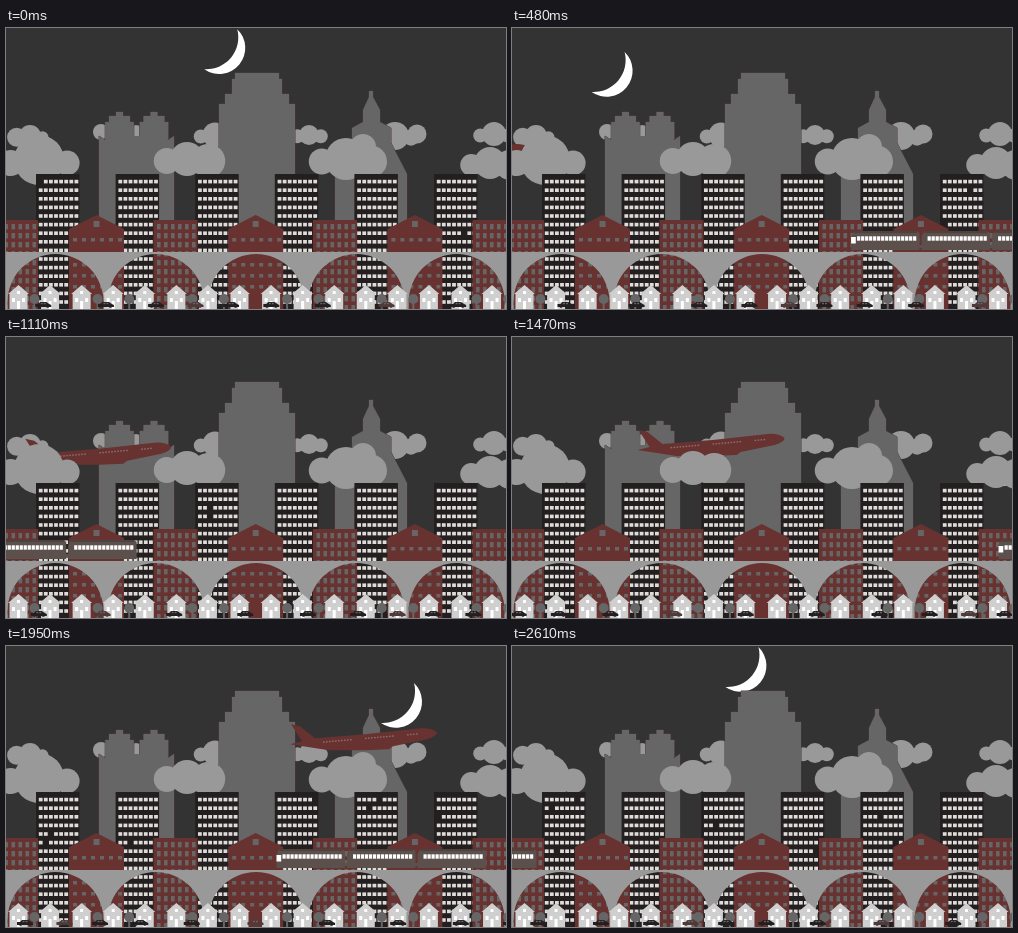
Animation of 500 by 281 pixels, one loop 2.67 s. Source, as an HTML page with a canvas:

```html
<!DOCTYPE html>
<html>
<head>
<meta charset="utf-8">
<style>
html, body { margin: 0; width: 100%; height: 100%; overflow: hidden; background: #333; }
canvas { display: block; }
</style>
</head>
<body>
<canvas id="stage" width="500" height="281"></canvas>
<script>
const ctx = document.getElementById('stage').getContext('2d');
const LOOP = 2670;
const SKY = '#333333', GRAY = '#666666', CLOUD = '#999999', BLACK = '#231f20',
      RED = '#673230', EDGE = '#4f3a39', LIT = '#dedbd8', STEEL = '#5c504c', WHITE = '#ffffff';

function rect(color, x, y, w, h) {
  ctx.fillStyle = color;
  ctx.fillRect(x, y, w, h);
}

function circle(color, x, y, r) {
  ctx.fillStyle = color;
  ctx.beginPath();
  ctx.arc(x, y, r, 0, 7);
  ctx.fill();
}

function shape(color, path, edge) {
  const outline = new Path2D(path);
  if (edge) {
    ctx.strokeStyle = edge;
    ctx.stroke(outline);
  }
  ctx.fillStyle = color;
  ctx.fill(outline, 'evenodd');
}

function at(x, y, draw) {
  ctx.save();
  ctx.translate(x, y);
  draw();
  ctx.restore();
}

function grid(color, x, y, cols, rows, dx, dy, w, h, visible = () => true) {
  for (let row = 0; row < rows; row++)
    for (let col = 0; col < cols; col++)
      if (visible(row, col)) rect(color, x + col * dx, y + row * dy, w, h);
}

function noise(a, b, c, d) {
  const n = Math.sin(a * 12.99 + b * 78.23 + c * 37.72 + d * 53.17) * 43758.5453;
  return n - Math.floor(n);
}

// A main puff with a smaller one leaning out on either side.
function cloud(x, y, r, left = 0, right = 0) {
  circle(CLOUD, x, y, r);
  circle(CLOUD, x - r - left / 4, y + r * 0.12, left);
  circle(CLOUD, x + r + right / 4, y + r * 0.12, right);
}

function backClouds() {
  cloud(24, 108, 11, 9.5, 6);
  cloud(95, 104, 8);
  cloud(130, 106, 9);
  cloud(209, 107, 12.5, 7);
  cloud(303, 107, 10, 7, 7);
  cloud(389, 108, 14, 0, 8);
  cloud(411, 106, 9.5);
  cloud(488, 106, 12, 7, 7);
}

function frontClouds() {
  cloud(33, 132, 25, 13, 12.5);
  cloud(181, 131, 17, 13, 17);
  cloud(340, 131, 21, 13, 16);
  cloud(357, 119, 13);
  cloud(484, 135, 16, 11, 15);
}

function moon(t) {
  const ahead = t < 1200 ? 0 : LOOP;
  const angle = -0.0333 - 0.000648 * (t - ahead);
  at(228 + 390 * Math.sin(angle), 411 - 390 * Math.cos(angle), () =>
    shape(WHITE, 'M16.5-20A26 26 0 0 1-16.5 20A32 32 0 0 0 16.5-20Z'));
}

// Symmetric stepped tower: alternating half widths and tops, from the base up.
function stepped(x, bottom, ...steps) {
  let left = '', right = '';
  for (let i = 0; i < steps.length; i += 2) {
    const half = steps[i], top = steps[i + 1];
    left += `H${x - half}V${top}`;
    right = `H${x + half}V${steps[i - 1] ?? bottom}` + right;
  }
  shape(GRAY, `M${x} ${bottom}${left}${right}Z`, EDGE);
}

function skyscrapers() {
  shape(GRAY, 'M93 108L99 112V110H162V112L168 108V225H93Z', EDGE);
  for (const x of [113.5, 148]) stepped(x, 111, 14.3, 94, 10.5, 88, 3.5, 84);
  rect(GRAY, 99.5, 108, 62, 6);
  stepped(251, 225, 38, 76, 32, 66, 25, 51, 22, 45);
  shape(GRAY, 'M363 63H367V69L374 82V94L385 100V115L401 146V225H329V140L346 135V100L357 94V82L363 69Z', EDGE);
}

function plane(t) {
  const x = 487 + 555 * Math.sin(0.000616 * (t - 2115));
  const y = 110 - 0.0815 * (x - 162) - 0.00004 * (x - 162) * (x - 272);
  at(x, y, () => {
    shape(RED, 'M-146-8L-137-6L-122 6L-72 2L-17-4Q-6-5 0 0Q0 4-10 7L-44 14L-48 17L-72 18H-108L-147 12L-135 9Z');
    for (let i = 0; i < 34; i++)
      if (i % 14 > 1 && i % 14 < 12) rect('#8a706e', -120 + i * 3, 9.5 - i * 0.26, 1.6, 1.4);
  });
}

function tower(n, t) {
  const x = 30 + n * 79.6;
  const phase = Math.floor(t / 445);
  rect(BLACK, x, 146, 43.5, 135);
  grid(LIT, x + 2.8, 151.8, 8, 15, 5.1, 8.6, 3.8, 3.6,
    (row, col) => noise(n, row, col, phase) > 0.012);
}

function brickBlock(x) {
  rect(RED, x, 192, 44, 89);
  grid(GRAY, x + 3.5, 196, 6, 10, 7, 9, 3.6, 5.4);
}

function gabled(x) {
  shape(RED, `M${x} 281V201L${x + 27.5} 187L${x + 55} 201V281Z`);
  rect(GRAY, x + 24.5, 193, 6, 6);
  grid(GRAY, x + 4, 210, 6, 1, 9, 0, 4, 3.5);
  grid(GRAY, x + 4, 235, 6, 3, 9, 11, 4, 3.5);
}

function train(t) {
  const x = -35 - 562 * Math.sin(0.00128 * (t % 1350 - 1050));
  rect(STEEL, x + 60, 217, 90, 3);
  for (let car = 0; car < 3; car++) at(x + car * 70.5, 203, () => {
    shape(STEEL, 'M3 0H66L68.5 2V19H0V5Z');
    rect('#4c423e', 3, 0, 63, 2);
    grid(WHITE, 6, 5.3, 15, 1, 4, 0, 3.2, 4.4);
    if (!car) rect(WHITE, 0, 6, 4.7, 6.5);
  });
}

function viaduct() {
  let path = 'M0 224H500V281H0Z';
  for (let x = 1.5; x < 500; x += 100.3)
    path += `M${x} 281V274A48 48 0 0 1 ${x + 96} 274V281Z`;
  shape(CLOUD, path);
}

function house(x) {
  at(x, 257, () => {
    shape('#cfcfcf', 'M0 0L10.5 9H9V24H-9V9H-10.5Z');
    grid(WHITE, -6.5, 13, 2, 1, 10, 0, 3, 4);
    rect(WHITE, -1.5, 6, 3, 3);
    rect(WHITE, -1.5, 16, 3, 8);
  });
}

function tree(x) {
  rect(GRAY, x - 1, 273, 2, 8);
  circle(GRAY, x, 271, 5);
}

function car(x, color) {
  at(x, 274, () => {
    shape(color, 'M-8 5V2L-5 2L-3 0H3L6 2L8 3V5H6A2 2 0 0 1 3 5H-3A2 2 0 0 1-6 5Z');
    grid(GRAY, -2.5, 0.8, 2, 1, 3, 0, 2, 1.4);
  });
}

function street(t) {
  for (let i = 0; i < 16; i++) {
    const x = 12.5 + i * 31.57;
    if (i % 3 != 1) tree(x + 16);
    house(x);
  }
  const span = 486;
  for (let i = 0; i < 9; i++) {
    const start = 19 + i * span / 9 + 27 * Math.cos((i - 1.2) * Math.PI * 2 / 9);
    const x = (start + span * t / LOOP) % span;
    for (const shift of [-span, 0, span]) car(x + shift, i % 4 == 3 ? EDGE : BLACK);
  }
}

function draw(t) {
  rect(SKY, 0, 0, 500, 281);
  moon(t);
  backClouds();
  skyscrapers();
  plane(t);
  frontClouds();
  for (let n = 0; n < 6; n++) tower(n, t);
  for (let n = 0; n < 4; n++) brickBlock(-12 + n * 159.5);
  for (let n = 0; n < 3; n++) gabled(63 + n * 159.2);
  train(t);
  viaduct();
  street(t);
}

const begin = performance.now();
function tick() {
  draw((performance.now() - begin) % LOOP);
  requestAnimationFrame(tick);
}
tick();
</script>
</body>
</html>
```
